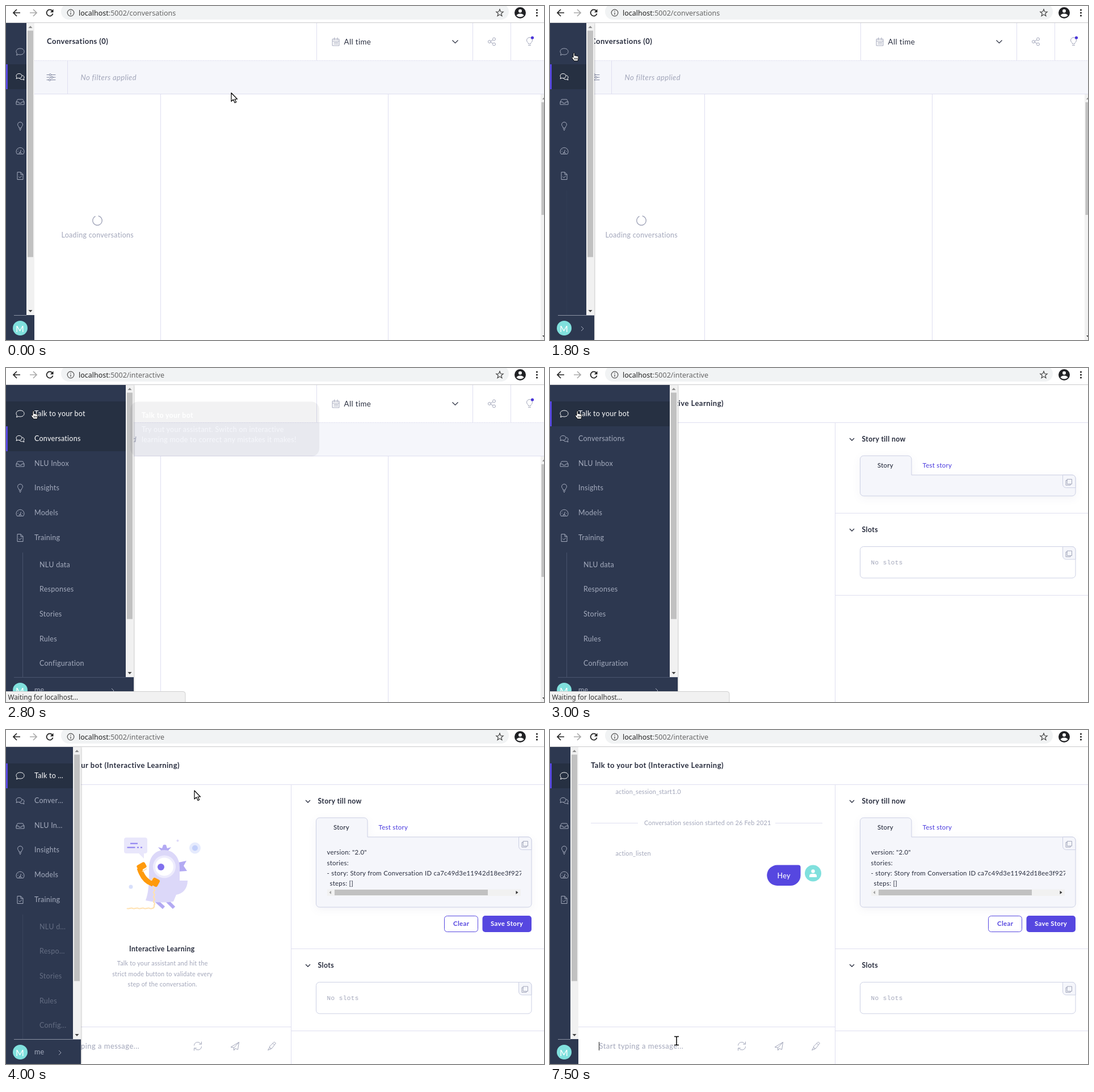
An HTML page for the animation above (8 s loop, 948 px wide and 590 px high).

```html
<!DOCTYPE html>
<html lang="en">
<head>
<meta charset="utf-8">
<title>Talk to your bot</title>
<style>
  html, body { margin: 0; width: 948px; height: 590px; overflow: hidden; background: #fff; }
  body { position: relative; font: 12.5px Lato, sans-serif; letter-spacing: .28px; }
  .layer { position: absolute; left: 0; top: 0; }
  text { white-space: pre; }
  .title { font-weight: 700; font-size: 13px; letter-spacing: .48px; fill: #282d3e; }
  .head { font-weight: 700; font-size: 12.3px; letter-spacing: .35px; fill: #282d3e; }
  .field { font-size: 13px; letter-spacing: .45px; fill: #a2a6ba; }
  .small { font-size: 10.8px; letter-spacing: .21px; fill: #a2a6ba; }
  .code { font-size: 11.4px; letter-spacing: .28px; fill: #282d3e; }
  .button { font-size: 11.4px; letter-spacing: .37px; }
  .mono { font: 11px "Liberation Mono", monospace; letter-spacing: .45px; fill: #a2a6ba; }
  .ui { font: 12.5px "Noto Sans", sans-serif; letter-spacing: 0; }
  .rule { stroke: #dfdff0; fill: none; }
  .icon { fill: none; stroke: #a2a6ba; stroke-linecap: round; stroke-linejoin: round; }
  .card { stroke: #ccd0e4; fill: #f5f6fb; }

  #nav { position: absolute; top: 30px; left: 0; height: 560px; overflow: hidden; background: #2d3850; color: #a4abbd; }
  #shade { position: absolute; top: 30px; left: 0; height: 560px; box-shadow: 0 0 3px #0006; clip-path: inset(0 -12px 0 0); }
  .row { position: absolute; left: 0; right: 0; height: 43.7px; line-height: 43.7px; }
  .row svg { position: absolute; left: 15.5px; top: 13px; fill: none; stroke: currentColor; stroke-linejoin: round; }
  .row span { position: absolute; left: 50px; right: 28px; overflow: hidden; white-space: nowrap; text-overflow: ellipsis; }
  .row.lit { background: #263042; color: #fff; }
  .row.on { box-shadow: inset 3px 0 #5647e0; }
  #sub { position: absolute; left: 0; right: 0; top: 0; }
  #sub .row span { left: 59px; right: 25px; }
  #sub i { position: absolute; left: 29px; top: 296px; height: 220px; border-left: 1px solid #47526c; }
  #bar { position: absolute; right: 0; top: 0; }
  #user { position: absolute; left: 0; right: 0; top: 516px; height: 44px; background: #2d3850; line-height: 46px; }
  #user hr { position: absolute; left: 14px; top: 0; margin: 0; border: 0; height: 1px; background: #6b7488; }
  #user b { position: absolute; left: 11.5px; top: 10px; width: 26px; height: 26px; border-radius: 50%; background: #80e0dd;
    color: #fff; font: 16px/27px Lato, sans-serif; text-align: center; letter-spacing: 0; }
  #user span { position: absolute; left: 50px; }
  #user svg { position: absolute; top: 18px; fill: none; stroke: currentColor; }
</style>
</head>
<body>
<svg class="layer" width="948" height="590">
  <defs>
    <g id="copy">
      <path class="card" d="M903.500 0v16.500a6 6 0 0 0 6 6h16.500V6a6 6 0 0 0-6-6z"/>
      <path class="icon" stroke="#8a8fa8" d="M911.500 7.500h8v8.500h-8zM911.500 9.500h-2.500v8.500h8v-2"/>
    </g>
    <path id="down" fill="none" stroke="#282d3e" stroke-width="1.3" d="M-4-2l4 4 4-4"/>
    <clipPath id="codeClip"><rect x="560" y="200" width="348" height="82"/></clipPath>
  </defs>

  <g id="conversations">
    <rect y="96" width="948" height="59" fill="#f5f6fb"/>
    <path class="rule" d="M547.500 30v66M822.500 30v66M889.500 30v66M108.500 96v59M272.500 155v435M673.500 155v435M50 155.500h898"/>
    <path class="rule" d="M50 96.500h898" stroke-dasharray="2 1"/>
    <text class="title" x="72" y="67">Conversations (0)</text>
    <text x="595.500" y="68" font-size="13.300" letter-spacing=".4" fill="#282d3e">All time</text>
    <path class="icon" d="M575.500 58.500h11.500v11.500h-11.500zM575.500 62h11.500M578.500 56v3.500M584 56v3.500M578 64.500h7M578 67h7" stroke="#8a8fa8"/>
    <path fill="none" stroke="#282d3e" stroke-width="1.200" d="M786.500 60.500l5 5 5-5"/>
    <g class="icon">
      <circle cx="852" cy="63" r="2.500"/><circle cx="860" cy="58.500" r="2.500"/><circle cx="860" cy="67.500" r="2.500"/>
      <path d="M854.200 62l3.500-2.200M854.200 64l3.500 2.200"/>
      <path d="M922.500 55.500a5 5 0 0 0-3 9q1 1 1 2.500h4q0-1.500 1-2.500a5 5 0 0 0-3-9M920.500 69.500h4"/>
      <path d="M72 121.500h4m4 0h7M72 126h7m4 0h4M72 130.500h3m4 0h8" stroke="#7f859e"/>
      <g stroke="#7f859e"><circle cx="78" cy="121.500" r="1.700"/><circle cx="81" cy="126" r="1.700"/><circle cx="77" cy="130.500" r="1.700"/></g>
    </g>
    <circle cx="927.500" cy="56" r="2.600" fill="#4a35d8"/>
    <text x="131.500" y="130.500" class="field" font-style="italic" style="letter-spacing:.38px">No filters applied</text>
    <circle id="spinner" class="icon" cx="161" cy="379" r="8.300" stroke-width="1.400" pathLength="100" stroke-dasharray="88 12"/>
    <text x="97.500" y="409" fill="#a2a6ba">Loading conversations</text>
    <path fill="#f1f1f1" d="M942 156h6v434h-6z"/><path fill="#c1c1c1" d="M943.500 170h5v199h-5z"/>
    <path fill="#8b8b8b" d="M945 165l3-3.500v3.500z"/><path fill="#333" d="M945 582h3v3z"/>
  </g>

  <g id="interactive">
    <path class="rule" d="M50 96.500h898M502.500 97v493"/>
    <text class="title" x="72" y="67">Talk to your bot (Interactive Learning)</text>
    <use href="#down" x="532" y="126"/><text class="head" x="549.500" y="130">Story till now</text>
    <path id="storyBox" class="card" style="filter:drop-shadow(0 4px 7px #2828600d)"/>
    <use href="#copy" y="189"/>
    <text class="code" x="577" y="176" font-weight="500">Story</text>
    <text class="code" x="656.500" y="176" font-weight="500" style="fill:#5647e0">Test story</text>

    <g id="loaded">
      <g class="code" clip-path="url(#codeClip)">
        <text x="565.500" y="220">version: "2.0"</text>
        <text x="565.500" y="238.500">stories:</text>
        <text x="565.500" y="257">- story: Story from Conversation ID ca7c49d3e11942d18ee3f927</text>
        <text x="570.500" y="275">steps: []</text>
      </g>
      <path fill="#f1f1f1" d="M566 281.500h341v11.500h-341z"/><path fill="#c1c1c1" d="M579 282h270v10h-270z"/>
      <path fill="#a3a3a3" d="M573 284v6l-3.500-3z"/><path fill="#333" d="M898.500 284v6l4-3z"/>
      <rect x="772.500" y="328.500" width="59" height="28" rx="5" fill="#fff" stroke="#5647e0"/>
      <rect x="839.500" y="328" width="86.500" height="29" rx="5" fill="#5647e0"/>
      <g class="button" font-weight="700">
        <text x="788" y="346" fill="#5647e0">Clear</text>
        <text x="854" y="346" fill="#fff">Save Story</text>
      </g>
      <path class="rule" d="M50 524.500h452"/>
      <g class="icon">
        <path d="M331.500 557a6.500 6.500 0 0 1 12-2.500M344.500 551v4h-4M344.500 559.500a6.500 6.500 0 0 1-12 2.500M331.500 566v-4h4"/>
        <path d="M396.500 560l14-8.500-2 13-4.500-2-2.500 3.500v-4.500zM401.500 561.500l9-10"/>
        <path d="M475 553l-2.500-2-8 8 .500 3 3 .500zM464.500 560.500l-3 5 5.500-2M470 553.500l2.500 2.500"/>
      </g>
      <text id="field" class="field" x="86.500" y="563"></text>
      <path id="caret" stroke="#222" d="M0 551v15"/>
    </g>

    <g id="slots">
      <path class="rule" d="M503 256.500h445M503 401.500h445"/>
      <use href="#down" x="532" y="286"/><text class="head" x="549.500" y="290">Slots</text>
      <rect class="card" x="546.500" y="315.500" width="379.500" height="55.500" rx="6" style="fill:#fff"/>
      <use href="#copy" y="315.500"/><text class="mono" x="565.500" y="347">No slots</text>
    </g>

    <g id="empty">
      <path fill="#e9e7fb" d="M212 190h33a4 4 0 0 1 4 4v20a4 4 0 0 1-4 4h-2v9l-9-9h-22a4 4 0 0 1-4-4v-20a4 4 0 0 1 4-4z"/>
      <path stroke="#8a7df0" stroke-width="2" d="M219 200.500h13M213.500 207.500h14M231 207.500h3M237 207.500h3"/>
      <circle cx="333" cy="208.500" r="10" fill="#e6ebfd"/><circle cx="333" cy="208.500" r="5" fill="#c3d0fa"/>
      <circle cx="220" cy="277" r="3.500" fill="#d8dffb"/><circle cx="302.500" cy="195.500" r="2" fill="#dedafa"/>
      <path fill="#b3aaf3" d="M274 214l-6-7 7 2 2-6q3-1 5 0l2 6 7-2-6 7zM304 234l14-3-5 9 6 9-15 1z"/>
      <path stroke="#b3aaf3" stroke-width="6" d="M265 302l13 12M284 302l12 12"/>
      <path fill="#dcd8f9" d="M252 243c0-20 12-31 27-31s27 12 27 31v23h14c0 14-8 23-20 25l-5 12q-24 4-49-2c6-16 6-32 6-58z"/>
      <circle cx="279" cy="241.500" r="20" fill="#eeecfd"/><circle cx="279" cy="241.500" r="16" fill="#fff"/><circle cx="273" cy="242" r="6" fill="#8170ee"/>
      <path fill="none" stroke="#ffe1b0" stroke-width="2.200" d="M261 277q-2 2 0 4t0 4 0 4 0 4 0 4 0 4 0 4 0 4q1 5-3 6t-5 0-5 0-5 0-5 0-5 0-5 0-5 0-5 0-5 0"/>
      <path fill="none" stroke="#ff9a0c" stroke-width="9" d="M235 244q7 23 24 28"/>
      <rect x="-8" y="-5.500" width="16" height="11" rx="3" fill="#ff9a0c" transform="translate(239 241) rotate(-30)"/>
      <rect x="-6.500" y="-7" width="13" height="14" rx="3" fill="#ff9a0c" transform="translate(263 269) rotate(28)"/>
      <path stroke="#ffe1b0" stroke-width="1.500" d="M240 250l8-5M255 266l5-6"/>
      <text class="head" x="217" y="391">Interactive Learning</text>
      <g class="small" text-anchor="middle">
        <text x="275.700" y="416">Talk to your assistant and hit the</text>
        <text x="275.700" y="434.500">strict mode button to validate every</text>
        <text x="275.700" y="452.500">step of the conversation.</text>
      </g>
    </g>

    <g id="chat">
      <path class="rule" d="M72 164.500h83M397 164.500h83"/>
      <text class="small" x="115.500" y="113">action_session_start1.0</text>
      <text class="small" x="166" y="167.500">Conversation session started on 26 Feb 2021</text>
      <text class="small" x="115.500" y="222">action_listen</text>
      <path fill="#5647e0" d="M400.500 238.500h37a4 4 0 0 1 4 4v14.500a18 18 0 0 1-18 18h-23a18 18 0 0 1 0-36.500z"/>
      <text x="400.500" y="261.500" fill="#fff" font-weight="500">Hey</text>
      <circle cx="463.500" cy="253" r="14.500" fill="#80e0dd"/>
      <circle cx="463.500" cy="249.500" r="3.200" fill="#fff"/><path fill="#fff" d="M457 260v-2q0-4 4-4h5q4 0 4 4v2z"/>
    </g>
  </g>
</svg>

<div id="shade"></div>
<div id="nav">
  <div id="rows"></div>
  <div id="sub"><i></i></div>
  <div id="user"><hr><b>M</b><span>me</span><svg id="more" width="6" height="12"><path d="M1 2l4 4-4 4"/></svg></div>
  <svg id="bar" width="14" height="516">
    <path fill="#f1f1f1" d="M0 0h14v516H0z"/><path fill="#c1c1c1" d="M2 13.500h10v400h-10z"/>
    <path fill="#8b8b8b" d="M3.500 9l3.500-4 3.500 4z"/><path fill="#444" d="M3.500 507h7l-3.500 4z"/>
  </svg>
</div>

<svg class="layer" width="948" height="590">
  <path fill="#fff" d="M0 0h948v29H0z"/><path stroke="#c9c9cc" d="M0 29.500h948"/>
  <rect x="97" y="-4" width="789" height="28" rx="14" fill="#f1f3f4"/>
  <g fill="none" stroke="#222" stroke-width="1.700">
    <path d="M25 12H13.500M19 6l-6 6 6 6"/><path stroke="#aaa" d="M42 12h11.500M48 6l6 6-6 6"/>
    <path d="M81.500 8.500A5.600 5.600 0 1 0 82.600 13.500"/>
    <circle cx="114" cy="12" r="5.800" stroke="#555" stroke-width="1.200"/><path stroke="#555" stroke-width="1.300" d="M114 11.500v4M114 8.500v1.500"/>
    <path stroke="#444" stroke-width="1.200" d="M870 5.800l1.700 4.200 4.500.300-3.500 2.900 1.200 4.400-3.900-2.500-3.900 2.500 1.200-4.400-3.500-2.900 4.500-.300z"/>
  </g>
  <path fill="#222" d="M83.500 5.500v5.700h-5.700z"/>
  <circle cx="906" cy="12" r="10" fill="#202124"/><circle cx="906" cy="8.800" r="3" fill="#fff"/><path fill="#fff" d="M899.500 17q1-3.500 6.500-3.500t6.500 3.500q-6.500 5-13 0z"/>
  <g fill="#222"><circle cx="935.500" cy="7" r="1.600"/><circle cx="935.500" cy="12" r="1.600"/><circle cx="935.500" cy="17" r="1.600"/></g>
  <text class="ui" x="128" y="16.500" fill="#222">localhost<tspan id="path" fill="#666"></tspan></text>

  <g id="tip" fill="#fff" style="filter:drop-shadow(0 3px 7px #0002)">
    <rect x="219" y="59.500" width="333" height="96.500" rx="14" fill="#262b38"/>
    <text class="head" x="239" y="87.500" style="fill:#fff">Talk to your bot</text>
    <text x="239" y="113">Try out your assistant. Switch on interactive</text>
    <text x="239" y="131">learning mode to correct any mistakes it makes!</text>
  </g>
  <g id="status">
    <path fill="#f1f1f1" stroke="#cfcfcf" d="M-1 571.500h313a4 4 0 0 1 4 4V591H-1z"/>
    <text class="ui" x="3.500" y="585.500" fill="#333" style="font-size:11.800px">Waiting for localhost…</text>
  </g>

  <path id="arrow" fill="#fff" stroke="#000" stroke-width="1.200" stroke-linejoin="round" d="M0 0v15l3.500-3.200 2.700 5.700 2.500-1.200-2.700-5.300h4.500z"/>
  <g id="hand" stroke="#000" fill="#fff" stroke-linejoin="round">
    <path d="M3 9V1.500q1.200-1.500 2.400 0V6q1.200-1 2.200.300 1.200-.800 2.200.400 1.700-.500 2.200 1V11l-1 4H4.500L.500 9.500Q1 7.500 3 9z"/>
    <path d="M5.500 9.500v3M7.700 9.500v3M9.900 9.500v3"/>
  </g>
  <path id="beam" fill="none" stroke="#000" stroke-width="1.500" d="M0 1h3l1 1 1-1h3M4 2v13M0 16h3l1-1 1 1h3"/>
</svg>

<script>
const $ = id => document.getElementById(id);
const show = (id, opacity) => { $(id).style.opacity = +opacity; };

const items = [
  ['Talk to your bot', 'M9 3c4.300 0 7 2.300 7 5.500S13.300 14 9 14q-1.500 0-3-.500L2.500 15l1-3Q2 10.500 2 8.500C2 5.300 4.700 3 9 3z'],
  ['Conversations', 'M7 3.500c3 0 5 1.700 5 4s-2 4-5 4q-1 0-2-.300L2 12.500l1-2.500q-1-1-1-2.500c0-2.300 2-4 5-4zM12.500 6.500c2 .300 3.500 1.700 3.500 3.500q0 1.300-1 2.300l1 2.500-3-1.200c-2 .500-4 0-5-1.600'],
  ['NLU Inbox', 'M2 9.500L4.500 5h9L16 9.500V14H2zM2 9.500h4l1 2h4l1-2h4'],
  ['Insights', 'M9 2a4.500 4.500 0 0 0-3 7.800q1 1 1 2.700h4q0-1.700 1-2.700A4.500 4.500 0 0 0 9 2zM7 14.500h4M8 16.500h2'],
  ['Models', 'M3.500 14.500a7 7 0 1 1 11 0zM8.500 13l2-6M4.500 10h1M6 6.500l.700.700M12.500 10h1M7 13.500a2 2 0 0 1 4 0'],
  ['Training', 'M4 2.500h6l4 4v9H4zM10 2.500v4h4M6.500 10.500l2 2 3.500-4'],
];
const row = (i, top, html) => `<div class="row" style="top:${top + 43.7 * i}px">${html}</div>`;
$('rows').innerHTML = items.map(([label, d], i) =>
  row(i, 29.2, `<svg width="18" height="18"><path d="${d}"/></svg><span>${label}</span>`)).join('');
$('sub').innerHTML += ['NLU data', 'Responses', 'Stories', 'Rules', 'Configuration']
  .map((label, i) => row(i, 295.5, `<span>${label}</span>`)).join('');
const rows = $('rows').children;

// Linear interpolation through [time, ...values] points.
function track(t, points) {
  const i = points.findIndex(p => p[0] > t);
  if (i < 0) return points.at(-1).slice(1);
  if (i === 0) return points[0].slice(1);
  const a = points[i - 1], b = points[i], k = (t - a[0]) / (b[0] - a[0]);
  return a.slice(1).map((v, j) => v + (b[j + 1] - v) * k);
}

const pointer = [[0, 397, 153.5], [400, 350, 141], [900, 226, 139], [1300, 130, 112], [1700, 42, 86], [1800, 38, 82],
  [2200, 38, 82], [2400, 44, 75], [3600, 44, 75], [3700, 75, 84], [3800, 200, 96], [3900, 305, 104], [4000, 332, 107],
  [4300, 332, 107], [4400, 333, 130], [4700, 270, 430], [4900, 222, 538], [5000, 219, 540.5]];
const navWidth = [[1700, 50], [1800, 78], [1900, 185], [2000, 225], [3800, 225], [3900, 205], [4000, 132], [4100, 66], [4200, 50]];
const tipFade = [[2200, 0], [2300, .5], [2400, .92], [2600, .92], [2700, .4], [2800, .06], [2900, 0]];
const statusFade = [[2600, 0], [2700, 1], [3000, 1], [3200, 0]];

function render(t) {
  const [w] = track(t, navWidth), [x, y] = track(t, pointer);
  const switched = t >= 3000, loaded = t >= 3300, sent = t >= 7500;

  $('path').textContent = ':5002/' + (t < 2600 ? 'conversations' : 'interactive');
  show('conversations', !switched);
  show('interactive', switched);
  $('spinner').setAttribute('transform', `rotate(${t * .4 - 75} 161 379)`);

  const bottom = loaded ? 313 : 226;
  $('storyBox').setAttribute('d', `M546.500 161a6 6 0 0 1 6-6h78.500a6 6 0 0 1 6 6v28h283a6 6 0 0 1 6 6V${bottom - 6}a6 6 0 0 1-6 6H552.500a6 6 0 0 1-6-6z`);
  $('slots').setAttribute('transform', `translate(0 ${loaded ? 130 : 0})`);
  show('loaded', loaded);
  show('empty', loaded && !sent);
  show('chat', sent);

  const typed = sent || t < 6300 ? '' : 'Hey'.slice(0, t < 6700 ? 1 : t < 6900 ? 2 : 3);
  const field = $('field');
  field.textContent = typed || 'Start typing a message...';
  field.style.fill = typed ? '#282d3e' : '';
  const caretX = typed ? 87 + field.getComputedTextLength() : 87;
  $('caret').setAttribute('transform', `translate(${Math.floor(caretX) - .5} 0)`);
  show('caret', t >= 5600 || t >= 4900 && t < 5000);

  $('nav').style.width = $('shade').style.width = w + 'px';
  show('shade', w > 50);
  show('sub', (w - 50) / 175);
  $('more').style.left = Math.max(57, w - 37) - 3 + 'px';
  document.querySelector('#user span').style.opacity = +(w > 100);
  const line = document.querySelector('#user hr').style;
  line.right = w > 50 ? 0 : '14px';
  line.background = w > 140 ? '#4a556e' : '#8b92a3';
  const hover = t >= 1900 && t < 3800;
  rows[0].className = 'row' + (hover || switched ? ' lit' : '') + (switched ? ' on' : '');
  rows[1].className = 'row' + (switched ? '' : ' lit on');

  show('tip', track(t, tipFade)[0]);
  show('status', track(t, statusFade)[0]);
  const shape = y > 525 ? 'beam' : t >= 1700 && t < 3800 ? 'hand' : 'arrow';
  for (const id of ['arrow', 'hand', 'beam']) {
    show(id, id === shape);
    $(id).setAttribute('transform', `translate(${x} ${y})`);
  }
}

// The screen updates ten times a second.
function loop() {
  render(Math.floor(performance.now() % 8000 / 100) * 100);
  requestAnimationFrame(loop);
}
loop();
</script>
</body>
</html>
```
